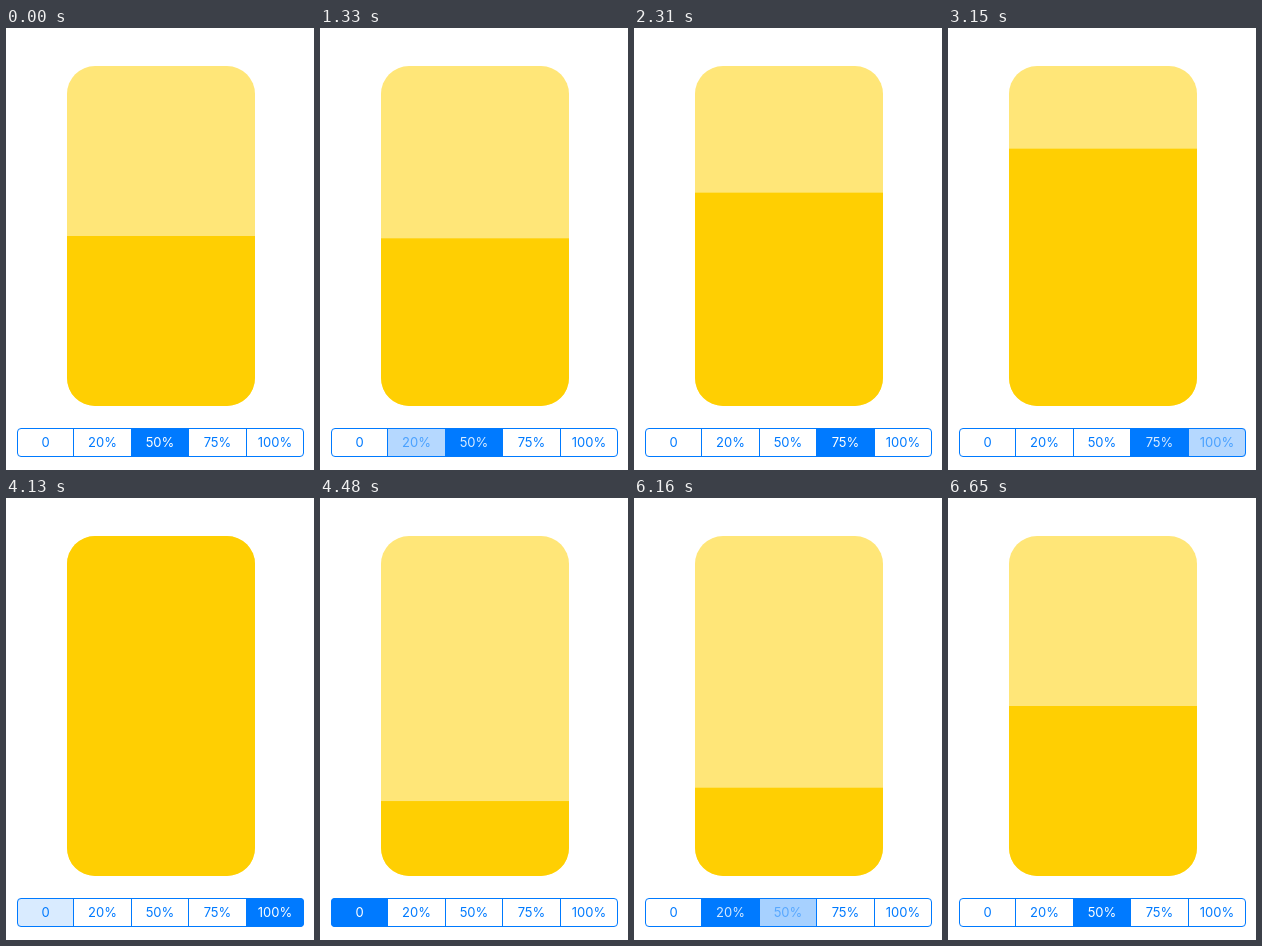
Recreate the animation shown at these times as an HTML page. Size 308 px wide and 442 px high, loop 7.07 s.

```html
<!DOCTYPE html>
<html lang="en">
<head>
<meta charset="utf-8">
<title>Fill level</title>
<style>
  html, body { margin: 0; width: 100%; height: 100%; overflow: hidden; background: #fff; }
  svg { display: block; width: 308px; height: 442px; }
  text { font: 13px Inter, "Liberation Sans", sans-serif; text-anchor: middle; }
  .seg { fill: #007aff; }
  .line { fill: none; stroke: #007aff; }
</style>
</head>
<body>
<svg viewBox="0 0 308 442">
  <defs>
    <clipPath id="tank"><rect x="61" y="38" width="188" height="340" rx="28"/></clipPath>
    <clipPath id="bar"><rect x="11" y="400" width="287" height="29" rx="4"/></clipPath>
  </defs>
  <g clip-path="url(#tank)">
    <rect x="61" y="38" width="188" height="340" fill="#ffe678"/>
    <rect id="fill" x="61" y="208" width="188" height="340" fill="#ffcf02"/>
  </g>
  <g id="segs" clip-path="url(#bar)"></g>
  <path class="line" d="M67.5 400v29M125.5 400v29M182.5 400v29M240.5 400v29"/>
  <rect class="line" x="11.5" y="400.5" width="286" height="28" rx="3.5"/>
  <g id="labels"></g>
</svg>
<script>
const LOOP = 7070, TICK = 70, DURATION = 500;
const FADE = 110, LEAD = 10, PRESSED = 0.15;
const TOP = 38, HEIGHT = 340, FIRST = 2;

const segments = [
  { label: '0', level: 0, x: 11 },
  { label: '20%', level: 0.25, x: 67 },
  { label: '50%', level: 0.5, x: 125 },
  { label: '75%', level: 0.75, x: 182 },
  { label: '100%', level: 1, x: 240 }
];
const taps = [
  { to: 1, press: 1308, start: 1308 },
  { to: 3, press: 2030, start: 2082 },
  { to: 4, press: 3128, start: 3128 },
  { to: 0, press: 4130, start: 4241 },
  { to: 1, press: 5180, start: 5257 },
  { to: 2, press: 6020, start: 6132 }
];

const $ = id => document.getElementById(id);
const clamp = v => Math.min(1, Math.max(0, v));
const mix = (a, b, k) => a + (b - a) * k;

function add(parent, name, attrs) {
  const el = document.createElementNS('http://www.w3.org/2000/svg', name);
  for (const key in attrs) el.setAttribute(key, attrs[key]);
  return parent.appendChild(el);
}

segments.forEach((s, i) => {
  const right = i < 4 ? segments[i + 1].x + 1 : 298;
  s.back = add($('segs'), 'rect', { class: 'seg', x: s.x, y: 400, width: right - s.x, height: 29 });
  s.text = add($('labels'), 'text', { x: (s.x + right) / 2, y: 419 });
  s.text.textContent = s.label;
});

// cubic-bezier(.25, .1, .25, 1)
function ease(x) {
  if (x <= 0 || x >= 1) return clamp(x);
  const curve = (u, a, b) => 3 * a * u * (1 - u) ** 2 + 3 * b * u * u * (1 - u) + u ** 3;
  let lo = 0, hi = 1;
  for (let i = 0; i < 24; i++) {
    const mid = (lo + hi) / 2;
    if (curve(mid, 0.25, 0.25) < x) lo = mid; else hi = mid;
  }
  return curve(lo, 0.1, 1);
}

function paint(s, back, white) {
  s.back.setAttribute('fill-opacity', back);
  s.text.setAttribute('fill', `rgb(${mix(0, 255, white)}, ${mix(122, 255, white)}, 255)`);
}

function draw(t) {
  let from = FIRST, to = FIRST, fade = 1, level = segments[FIRST].level;
  for (const tap of taps) {
    if (t < tap.press) break;
    from = to;
    to = tap.to;
    fade = clamp((t - tap.start + LEAD) / FADE);
    level = mix(segments[from].level, segments[to].level, ease((t - tap.start) / DURATION));
  }
  segments.forEach((s, i) => {
    if (i === to) paint(s, Math.max(PRESSED, fade), fade);
    else if (i === from && fade < 1) paint(s, 1, 1 - fade / 2);
    else paint(s, 0, 0);
  });
  $('fill').setAttribute('y', TOP + HEIGHT * (1 - level));
}

const begin = performance.now();
function frame() {
  const t = (performance.now() - begin) % LOOP;
  draw(Math.floor((t + 1) / TICK) * TICK);
  requestAnimationFrame(frame);
}
frame();
</script>
</body>
</html>
```
